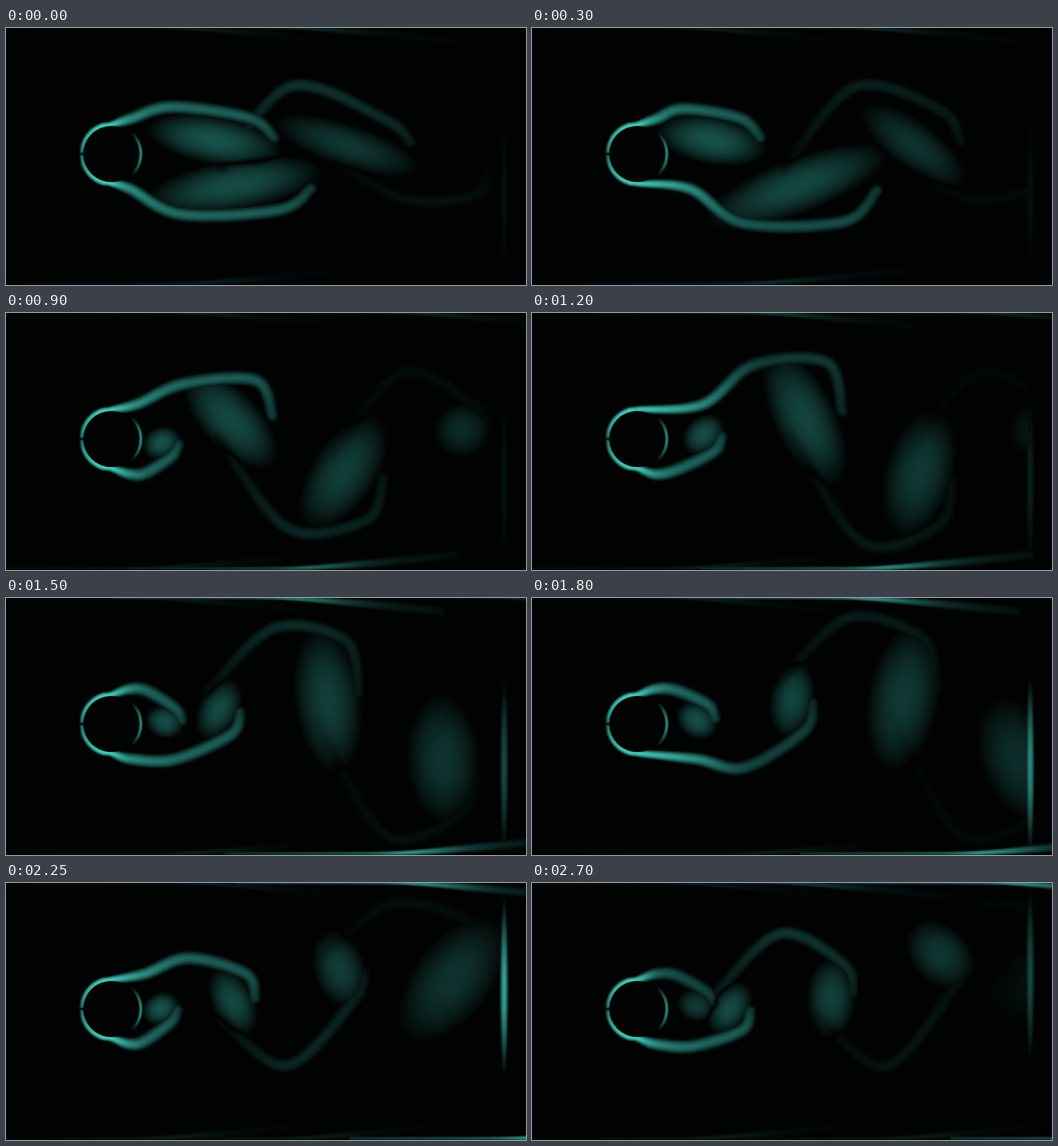
Animation of 619 by 307 pixels, one loop 2.85 s. Source, as an HTML page with a canvas:

```html
<!DOCTYPE html>
<html lang="en">
<head>
<meta charset="utf-8">
<title>Cylinder wake</title>
<style>
html, body { margin: 0; width: 100%; height: 100%; overflow: hidden; background: #000302; }
canvas { display: block; }
</style>
</head>
<body>
<canvas id="stage" width="619" height="307"></canvas>
<script>
const W = 619, H = 307, STEP = 150, LOOP = 2850;
const CX = 125.5, CY = 150.5, R = 33.5, OUTLET = 590;

// Shed in turn, below (even) and above (odd) the axis.
// y, drift: height at birth and climb per step; tall: half length; upright: age when vertical.
const FIRST = -2;
const SHED = [
  { y: 150, drift: 0, tall: 0, upright: 12 },
  { y: 140, drift: 0, tall: 34, upright: 15.5 },
  { y: 187, drift: 0.4, tall: 80, upright: 12.5 },
  { y: 134, drift: -1.4, tall: 90, upright: 9 },
  { y: 155, drift: -6, tall: 48, upright: 6.7 },
  { y: 148, drift: -1.5, tall: 50, upright: 7.2 },
  { y: 150, drift: 0, tall: 48, upright: 6.7 },
  { y: 146, drift: 0, tall: 50, upright: 7.2 }
];

const mix = (a, b, u) => a + (b - a) * u;
const clamp = (v, lo, hi) => Math.min(hi, Math.max(lo, v));

function ramp(v, from, to) {
  const u = clamp((v - from) / (to - from), 0, 1);
  return u * u * (3 - 2 * u);
}

const birth = n => -2.8 + 4.7 * n - 0.06 * n * n;

function vortex(n, t) {
  const { y, drift, tall, upright } = SHED[n - FIRST];
  const side = n & 1 ? -1 : 1;
  const age = t - birth(n);
  const calm = 1 - ramp(t, 0, 6);          // the wake starts long and steady
  const tilt = clamp(-side * 9 * (age - upright), -80, 80) * Math.PI / 180;
  const w = 20 + 1.4 * Math.max(age, 0) + (tall - 50) / 4;
  const h = mix(24, tall, ramp(age, 0, 6)) + 60 * calm;
  return {
    side, age, calm, tall, tilt, w, h,
    x: 184 + 30 * (Math.hypot(age, 1.7) - 1.7) + 40 * calm,
    y: y + drift * Math.max(age, 0),
    spanX: Math.hypot(h * Math.sin(tilt), w * Math.cos(tilt)),
    spanY: Math.hypot(h * Math.cos(tilt), w * Math.sin(tilt)),
    presence: age < -2.5 ? 0 : Math.max(ramp(age, -2.5, -0.5), calm),
    core: (34 - Math.max(age, 0)) * Math.min(1, tall / 40) * (1 - ramp(age, 14.5, 17.5))
  };
}

const shade = v => `rgb(${[70, 240, 220].map(c => Math.round(c * v)).join()})`;

function puff(ctx, x, y, w, h, strength, tilt = 0, power = 1.5) {
  const glow = ctx.createRadialGradient(0, 0, 0, 0, 0, 1);
  for (let n = 0; n <= 6; n++) {
    const d = n / 6;
    glow.addColorStop(d, shade(clamp(strength / 100, 0, 1) * (1 - d * d) ** power));
  }
  ctx.save();
  ctx.translate(x, y);
  ctx.rotate(tilt);
  ctx.scale(w, h);
  ctx.fillStyle = glow;
  ctx.fillRect(-1, -1, 2, 2);
  ctx.restore();
}

function spline(a, b, c, d, u) {
  return b + u / 2 * (c - a + u * (2 * a - 5 * b + 4 * c - d + u * (3 * (b - c) + d - a)));
}

// Points are [x, y, radius, strength].
function ribbon(ctx, pts) {
  for (let i = 0; i + 1 < pts.length; i++) {
    const b = pts[i], c = pts[i + 1], a = pts[i - 1] || b, d = pts[i + 2] || c;
    const gap = Math.max(1, Math.min(b[2], c[2]) / 6);
    const n = Math.ceil(Math.hypot(c[0] - b[0], c[1] - b[1]) / gap);
    for (let s = 0; s <= n; s++) {
      const [x, y, r, v] = b.map((_, j) => spline(a[j], b[j], c[j], d[j], s / n));
      if (v > 0.5) puff(ctx, x, y, Math.max(r, 1.5), Math.max(r, 1.5), v);
    }
  }
}

function rim(from, to, strength) {
  return Array.from({ length: 6 }, (_, n) => {
    const a = mix(from, to, n / 5);
    return [CX + 35 * Math.cos(a), CY + 35 * Math.sin(a), ...strength(n / 5)];
  });
}

const frontRim = side => rim(Math.PI * 0.99, Math.PI * (1 - side / 2) - side * Math.PI * 0, u => [4 + 1.5 * u, 45 + 95 * u - 55 * u * u])
  .map(([x, y, ...rest]) => [x, CY + side * Math.abs(y - CY), ...rest]);

// The sheet rolls from the cylinder, or from the next vortex upstream, round the core.
function sheet(a, next) {
  const { side, age } = a;
  const grown = next ? ramp(next.age, -1, 1) : 0;
  const lead = next ? mix(148, next.x, grown) : 148;
  const leadY = next ? mix(CY, next.y, grown) : CY;
  const free = ramp(age, 6, 7.5);
  const reach = Math.min(Math.max(38, 18 + 9 * age) + 10 * a.calm, 60 + a.tall);
  const glow = 44 * Math.exp(-Math.max(0, age - 4) / 4.5) * a.presence;
  const crest = [mix(lead, a.x, 0.5), clamp((leadY + a.y) / 2 + side * reach, 24, 283)];
  const body = [
    [lead - 15 * free, mix(CY + side * 42, leadY + side * 20, free), 9, mix(58, glow * 0.3, free) * a.presence],
    [...crest, 10, glow],
    [a.x + 0.5 * a.spanX, a.y + side * 0.8 * a.spanY, 10, glow * 0.85],
    [a.x + 0.85 * a.spanX, a.y + side * 0.1 * a.spanY, 9, Math.min(glow * 0.6, a.core * 0.8)]
  ];
  return { crest, path: age < 7 ? [...frontRim(side), ...body] : body };
}

function wallFilm(ctx, side, [x, y]) {
  const s = 12 + 48 * ramp(side * (y - CY), 70, 135);
  const wall = side > 0 ? H - 2 : 0;
  const at = (dx, lift, r, v) => [x + 30 + dx, wall - side * lift, r, v * s];
  ribbon(ctx, [at(-220, 0, 3, 0.3), at(-60, 0, 3, 0.6), at(0, 1, 4, 1), at(80, 7, 7, 0.35), at(170, 16, 8, 0.12)]);
}

function layer() {
  const canvas = document.createElement('canvas');
  canvas.width = W;
  canvas.height = H;
  return canvas.getContext('2d');
}

function clear(ctx) {
  ctx.globalCompositeOperation = 'source-over';
  ctx.fillStyle = '#000';
  ctx.fillRect(0, 0, W, H);
  ctx.globalCompositeOperation = 'lighten';
}

const screen = document.getElementById('stage').getContext('2d');
const upper = layer(), lower = layer();

function draw(t) {
  const wake = SHED.map((_, i) => vortex(i + FIRST, t));
  const films = [];
  clear(upper);
  clear(lower);
  wake.forEach((v, i) => {
    if (!v.presence) return;
    const ctx = v.side > 0 ? lower : upper;
    const { crest, path } = sheet(v, wake[i + 1]);
    puff(ctx, v.x, v.y, v.w, v.h, v.core * v.presence, v.tilt, 1.1);
    ribbon(ctx, path);
    if (v.tall) films.push([v.side, crest]);
  });

  // Opposite spins cancel, which leaves the dark seams.
  clear(screen);
  screen.drawImage(upper.canvas, 0, 0);
  screen.globalCompositeOperation = 'difference';
  screen.drawImage(lower.canvas, 0, 0);
  screen.globalCompositeOperation = 'source-over';
  screen.fillStyle = '#000';
  screen.fillRect(OUTLET, 0, W - OUTLET, H);
  screen.beginPath();
  screen.arc(CX, CY, R, 0, 2 * Math.PI);
  screen.fill();

  screen.globalCompositeOperation = 'lighten';
  ribbon(screen, rim(-0.75, 0.75, u => [2.8, 50 * Math.sin(Math.PI * u) + 8]));
  films.forEach(film => wallFilm(screen, ...film));
  const surge = Math.exp(-(((t - 14) / 4) ** 2));
  puff(screen, OUTLET + 3, mix(200, 110, ramp(t, 12, 16)), 6, 110, 6 + 66 * surge);
  screen.fillStyle = '#000302';
  screen.fillRect(0, 0, W, H);
}

const start = performance.now();
let shown = -1;

function tick() {
  const step = Math.floor((performance.now() - start) % LOOP / STEP);
  if (step !== shown) draw(shown = step);
  requestAnimationFrame(tick);
}
tick();
</script>
</body>
</html>
```
